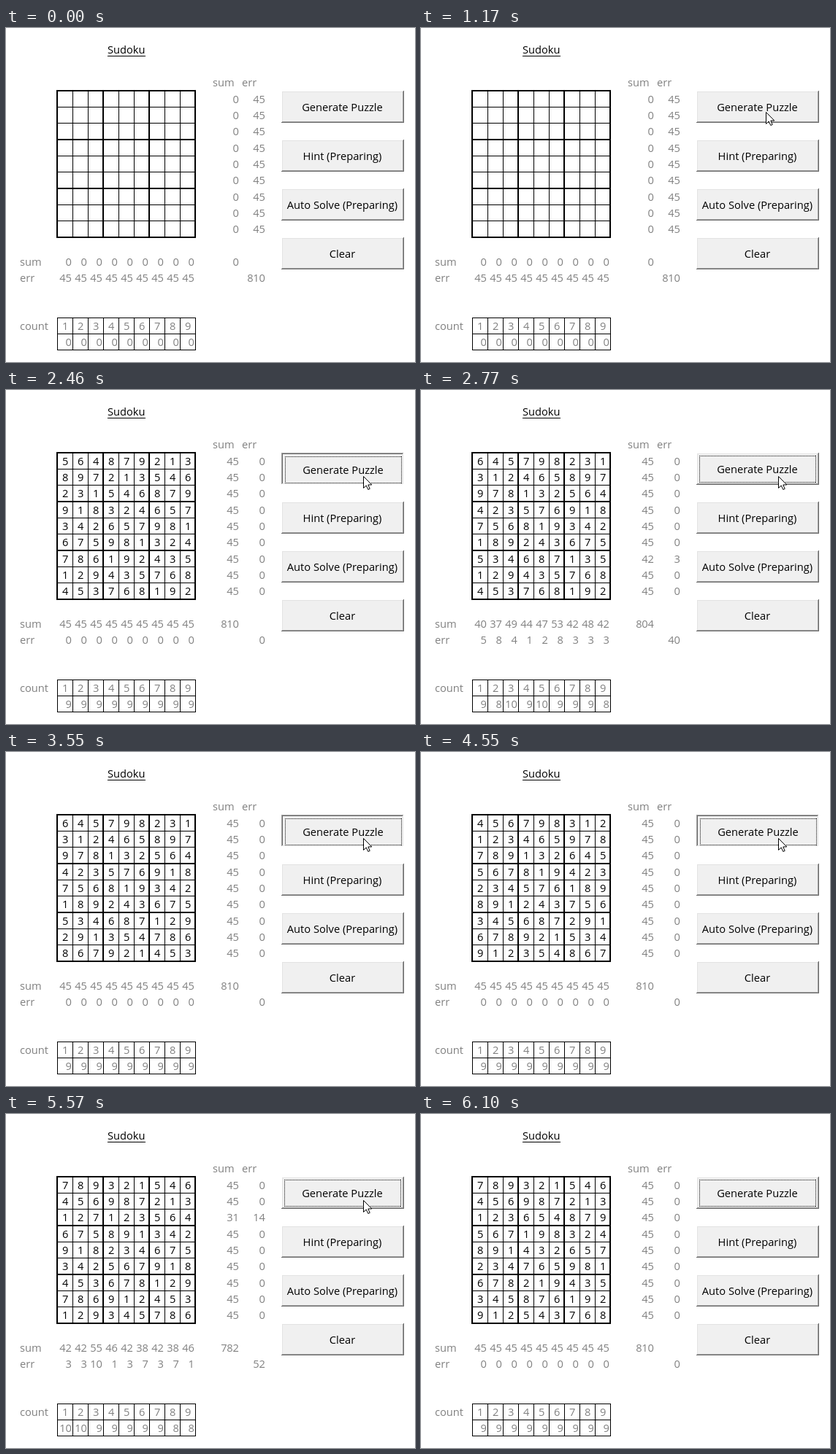
Animation of 560 by 458 pixels, one loop 7200 ms. Source, as an HTML page:

```html
<!DOCTYPE html>
<html lang="en">
<head>
<meta charset="utf-8">
<title>Sudoku</title>
<style>
  html, body { margin: 0; width: 100%; height: 100%; overflow: hidden; background: #fff; }
  svg { display: block; width: 560px; height: 458px; }
  text { font: 14.67px "Open Sans", "Noto Sans", sans-serif; }
  .num { letter-spacing: -.3px; }
</style>
</head>
<body>
<svg id="stage" viewBox="0 0 560 458"></svg>
<script>
const LOOP = 7200;
const GREY = '#808080';
const NINE = [...Array(9).keys()];
const stage = document.getElementById('stage');

function add(tag, attrs, parent = stage) {
  const node = document.createElementNS('http://www.w3.org/2000/svg', tag);
  for (const key in attrs) node.setAttribute(key, attrs[key]);
  parent.appendChild(node);
  return node;
}

function rect(x, y, width, height, fill = '#000', parent = stage) {
  return add('rect', { x, y, width, height, fill, 'shape-rendering': 'crispEdges' }, parent);
}

function label(x, y, string, fill = GREY, anchor = 'start', parent = stage) {
  const node = add('text', { x, y, fill, 'text-anchor': anchor }, parent);
  node.textContent = string;
  return node;
}

function number(x, y, fill = GREY, anchor = 'end') {
  const node = label(x, y, '', fill, anchor);
  node.setAttribute('class', 'num');
  return node;
}

function setText(node, value) {
  const string = String(value);
  if (node.textContent !== string) node.textContent = string;
}

// Sheet
const lineX = i => 70 + 21 * i;
const lineY = i => 86 + 22 * i + Math.floor(i / 3);
const baseY = r => lineY(r) + 17;

label(139, 35, 'Sudoku', '#000');
rect(139, 38, 52, 1);
label(283, 80, 'sum');
label(323, 80, 'err');
label(19, 326, 'sum');
label(19, 348, 'err');
label(19, 414, 'count');

for (let i = 0; i < 10; i++) {
  const bold = i % 3 === 0 ? 1 : 0;
  rect(lineX(i) - bold, 85, 1 + bold, 203);
  rect(69, lineY(i) - bold, 191, 1 + bold);
  rect(lineX(i), 397, 1, 45);
}
[397, 419, 441].forEach(y => rect(70, y, 190, 1));

const cells = NINE.map(r => NINE.map(c => number(81 + 21 * c, baseY(r), '#000', 'middle')));
const rowSum = NINE.map(r => number(318.5, baseY(r)));
const rowErr = NINE.map(r => number(354.5, baseY(r)));
const colX = c => 89.5 + 21 * c;
const colSum = NINE.map(c => number(colX(c), 326));
const colErr = NINE.map(c => number(colX(c), 348));
const counts = NINE.map(c => number(colX(c), 436));
const allSum = number(318.5, 326);
const allErr = number(354.5, 348);
NINE.forEach(c => setText(number(81 + 21 * c, 414, GREY, 'middle'), c + 1));

// Buttons
function bevel(group, outerTop, innerTop, outerEnd, innerEnd) {
  rect(0, 0, 168, 44, outerEnd, group);
  rect(0, 0, 167, 43, outerTop, group);
  rect(1, 1, 166, 42, innerEnd, group);
  rect(1, 1, 165, 41, innerTop, group);
  rect(2, 2, 164, 40, '#f0f0f0', group);
}

function button(y, caption) {
  const group = add('g', { transform: `translate(377 ${y})` });
  const raised = add('g', {}, group);
  const sunken = add('g', { visibility: 'hidden' }, group);
  bevel(raised, '#fff', '#e3e3e3', '#696969', '#a0a0a0');
  bevel(sunken, '#a0a0a0', '#696969', '#fff', '#e3e3e3');
  const face = add('g', {}, group);
  label(83.5, 28, caption, '#000', 'middle', face);
  const focus = add('path', {
    d: 'M4 4.5H164M4 40.5H164M4.5 4V41M163.5 4V41', fill: 'none', stroke: '#0f0f0f',
    'stroke-dasharray': '1 1', 'shape-rendering': 'crispEdges', visibility: 'hidden'
  }, face);
  return { sunken, face, focus };
}

const generate = button(86, 'Generate Puzzle');
button(153, 'Hint (Preparing)');
button(220, 'Auto Solve (Preparing)');
button(287, 'Clear');

const pointer = add('path', {
  d: 'M.5 .5V16.5L4.2 13 6.8 18.5 9.2 17.5 6.8 12H11.8Z',
  fill: '#fff', stroke: '#000', 'stroke-width': 1
});

// Every grid is its first row shifted, modulo nine, by its first column.
function makeGrid([row, column]) {
  return [...column].flatMap(start =>
    [...row].map(d => (+d + +start - row[0] + 17) % 9 + 1));
}

const grids = [Array(81).fill(0), ...[
  ['564879213', '582936714'],
  ['645798231', '639471528'],
  ['456798312', '417528369'],
  ['564789231', '528693471'],
  ['789321546', '741582639']
].map(makeGrid)];

// Bursts of movement: start, end, number of steps
const bursts = [
  [200, 790, 7], [980, 1270, 4], [1460, 1760, 4], [2460, 2860, 5],
  [3550, 3960, 5], [4550, 4970, 5], [5460, 6100, 7]
];

function stepAt(t, [start, end, count]) {
  const step = Math.floor((t - start) / (end - start) * (count - 1) + 1e-6);
  return Math.max(-1, Math.min(count - 1, step));
}

const mix = (a, b, k) => a + (b - a) * k;
const between = (a, b, k) => [mix(a[0], b[0], k), mix(a[1], b[1], k)];
const ENTRY = [410, 418], ARRIVE = [455, 115], PRESS = [481, 115], REST = [489, 118];

function pointerAt(steps) {
  const [enter, approach, first] = steps;
  const leave = steps[6];
  if (enter < 0 || leave === 6) return null;
  if (leave > 3) return between(REST, [540, 190], leave === 4 ? .35 : 1);
  if (first >= 0) return between(PRESS, REST, first / 3);
  if (approach >= 0) return between(ARRIVE, PRESS, Math.min(1, (approach + 1) / 3));
  return between(ENTRY, ARRIVE, 1 - (1 - enter / 6) ** 1.6);
}

function showGrid(values) {
  let sumTotal = 0, errTotal = 0;
  const tally = (list, sumNode, errNode) => {
    const sum = list.reduce((a, b) => a + b, 0);
    const err = Math.abs(45 - sum);
    setText(sumNode, sum);
    setText(errNode, err);
    sumTotal += sum;
    errTotal += err;
  };
  values.forEach((v, i) => setText(cells[Math.floor(i / 9)][i % 9], v || ''));
  NINE.forEach(i => {
    tally(values.slice(9 * i, 9 * i + 9), rowSum[i], rowErr[i]);
    tally(NINE.map(r => values[9 * r + i]), colSum[i], colErr[i]);
    setText(counts[i], values.filter(v => v === i + 1).length);
  });
  setText(allSum, sumTotal);
  setText(allErr, errTotal);
}

function draw(t) {
  const steps = bursts.map(b => stepAt(t, b));

  let values = grids[0];
  for (let n = 1; n < grids.length; n++) {
    const stage = n === 1 ? steps[2] + 1 : steps[n + 1];
    const filled = Math.round(81 * Math.max(0, Math.min(1, stage / 4)));
    values = [...grids[n].slice(0, filled), ...values.slice(filled)];
  }
  showGrid(values);

  const focused = steps[1] === 3;
  const pressed = focused && steps[2] < 0 || steps.slice(3).includes(0);
  generate.sunken.setAttribute('visibility', pressed ? 'visible' : 'hidden');
  generate.focus.setAttribute('visibility', focused ? 'visible' : 'hidden');
  generate.face.setAttribute('transform', pressed ? 'translate(1 1)' : 'translate(0 0)');

  const at = pointerAt(steps);
  pointer.setAttribute('visibility', at ? 'visible' : 'hidden');
  if (at) pointer.setAttribute('transform', `translate(${at.map(Math.round).join(' ')})`);
}

const begin = performance.now();
function tick() {
  draw((performance.now() - begin) % LOOP);
  requestAnimationFrame(tick);
}
tick();
</script>
</body>
</html>
```
